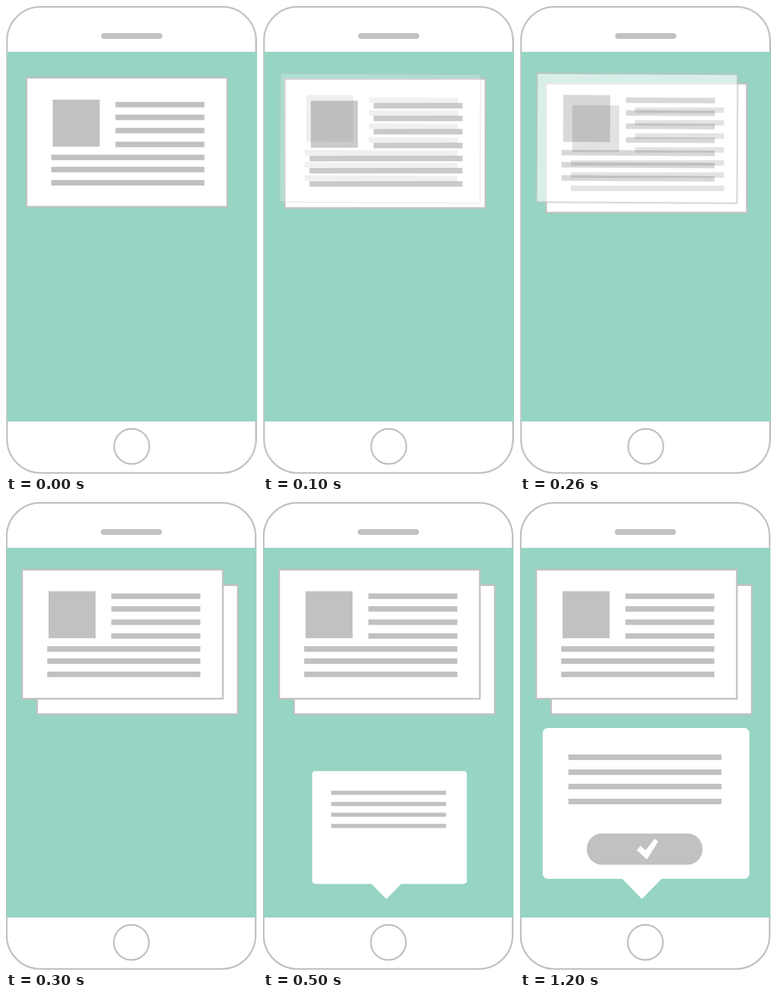
Recreate the animation shown at these times as an HTML page. Size 454 by 847 pixels, loop 1600 ms.

```html
<!DOCTYPE html>
<html lang="en">
<head>
<meta charset="utf-8">
<title>Phone cards</title>
<style>
  html, body { margin: 0; width: 100%; height: 100%; overflow: hidden; background: #fff; }
  svg { display: block; width: 454px; height: 847px; }

  .grey { fill: #c1c1c1; }
  .white { fill: #fff; }
  .line { fill: #fff; stroke: #c1c1c1; stroke-width: 3; }
  .screen { fill: #96d4c4; }

  /* One step is 100 ms = 6.25% of the loop. */
  .body, .screen, .back, .ink, .front, .bubble, .button {
    animation: 1600ms step-end infinite;
  }
  .body { animation-name: body; }
  .screen { animation-name: screen; }
  .back { animation-name: back; }
  .ink { animation-name: ink; mix-blend-mode: multiply; }
  .front { animation-name: front; transform-origin: 211px 239px; }
  .bubble { animation-name: bubble; }
  .button { animation-name: button; }

  @keyframes body {
    0% { transform: translate(.6px, 0); }
    18.75%, 100% { transform: none; }
  }
  @keyframes screen {
    0% { transform: translate(1.2px, 0); }
    18.75%, 100% { transform: none; }
  }
  @keyframes back {
    0% { transform: translate(8px, 7.3px); }
    6.25% { transform: translate(10px, 9.5px); }
    12.5% { transform: translate(18px, 18px); }
    18.75%, 100% { transform: translate(27px, 28px); }
  }
  @keyframes ink {
    0% { transform: translate(7.5px, 8px); opacity: 1; }
    6.25% { transform: translate(9.5px, 10px); opacity: .86; }
    12.5% { transform: translate(17.5px, 18px); opacity: .45; }
    18.75%, 100% { transform: translate(27px, 28px); opacity: 0; }
  }
  @keyframes front {
    0% { transform: translate(1px, 0) rotate(.35deg); opacity: 0; }
    6.25% { transform: translate(1px, 0) rotate(.35deg); opacity: .24; }
    12.5% { transform: translate(.9px, 0) rotate(.3deg); opacity: .63; }
    18.75%, 100% { transform: none; opacity: 1; }
  }
  @keyframes bubble {
    0% { transform: translate(130.5px, 562.5px) scale(.505); visibility: hidden; }
    25% { transform: translate(130.5px, 562.5px) scale(.505); visibility: visible; }
    31.25% { transform: translate(88.5px, 486.5px) scale(.75); visibility: visible; }
    37.5%, 100% { transform: translate(41px, 409px); visibility: visible; }
  }
  @keyframes button {
    0% { opacity: 0; }
    37.5%, 100% { opacity: 1; }
  }
</style>
</head>
<body>
<svg viewBox="0 0 454 847">
  <defs>
    <rect id="card" class="line" x="29.2" y="122.5" width="363" height="233.5"/>
    <g id="text" class="grey">
      <rect x="77" y="161.5" width="85" height="85"/>
      <path d="M190.5 165.5h161v10h-161zM190.5 188.5h161v10h-161zM190.5 212.5h161v10h-161zM190.5 237.5h161v10h-161z"/>
      <path d="M74.5 261h277v10h-277zM74.5 283h277v10h-277zM74.5 307h277v10h-277z"/>
    </g>
  </defs>

  <g class="body">
    <rect class="line" x="1.2" y="1.5" width="450.3" height="843.5" rx="61"/>
    <rect class="grey" x="171.4" y="49" width="110.8" height="10.5" rx="5.2"/>
    <circle class="line" cx="226.8" cy="797" r="31.8"/>
  </g>
  <rect class="screen" x="1.2" y="83" width="451.8" height="669"/>

  <use class="back" href="#card"/>
  <g class="front">
    <use href="#card"/>
    <use href="#text"/>
  </g>
  <use class="ink" href="#text"/>

  <g class="bubble">
    <rect class="white" width="374" height="273" rx="9"/>
    <path class="white" d="M143 272h73l-36.5 37.5z"/>
    <path class="grey" d="M46.5 48h277v10h-277zM46.5 75h277v10h-277zM46.5 101h277v10h-277zM46.5 128h277v10h-277z"/>
    <g class="button">
      <rect class="grey" x="80" y="191" width="209" height="56.5" rx="27"/>
      <path class="white" d="M170 221l7-8 9 8.500 16.500-21 6.500 5-20.500 32.500z"/>
    </g>
  </g>
</svg>
</body>
</html>
```
